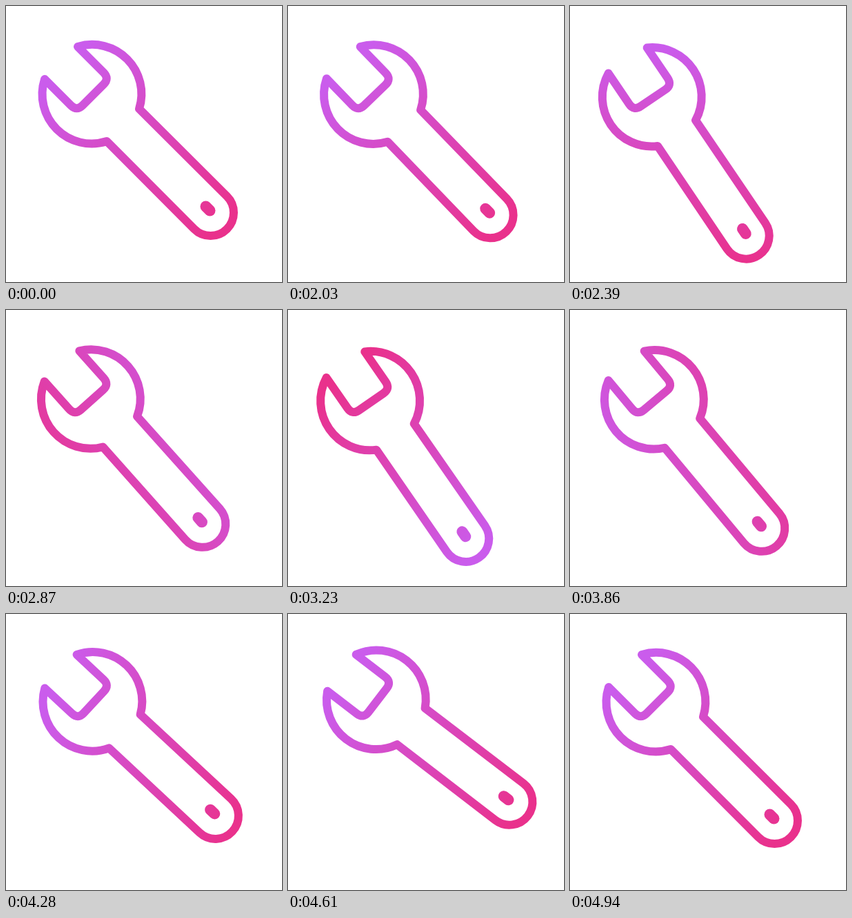
Write an HTML page that moves like this. It is 400 px wide and 400 px high and loops after 4.97 s.

```html
<!DOCTYPE html>
<html lang="en">
<head>
<meta charset="utf-8">
<title>Wrench</title>
<style>
  html, body { margin: 0; width: 100%; height: 100%; overflow: hidden; background: #fff; }
  svg { display: block; width: 100vw; height: 100vh; }
</style>
</head>
<body>
<svg viewBox="0 0 400 400">
  <defs>
    <linearGradient id="tint" gradientUnits="userSpaceOnUse">
      <stop offset="0" stop-color="#ca5cec"/>
      <stop offset="1" stop-color="#e9318c"/>
    </linearGradient>
  </defs>
  <g id="wrench" fill="none" stroke="url(#tint)" stroke-linecap="round" stroke-linejoin="round">
    <path stroke-width="12" d="M104 59 A71.5 71.5 0 0 1 193 149 L320.2 275.8
      A33.5 33.5 0 0 1 272.8 323.2 L146 196 A71.5 71.5 0 0 1 56 106
      L94 144 Q102.5 152.5 111 144 L141.5 113.5 Q150 105 141.5 96.5 Z"/>
    <path stroke-width="16" d="M289.5 290.5 L295.5 296.5"/>
  </g>
</svg>
<script>
const LOOP = 4970, REST = 2000, STEP = 30;
const PIVOT = 100, CENTER = 200, REACH = 160, TURN_STEPS = 85;

// [step, angle] pairs, eased in and out between neighbours
const SWING = [
  [0, 0], [7.5, 22.5], [21, -10], [23, -10], [36.6, 22.5], [47, -9.6],
  [55.3, -10], [69.3, 22.5], [79.3, -10], [83, -10], [95, 0], [99, 0]
];

const wrench = document.getElementById('wrench');
const tint = document.getElementById('tint');

function swingAngle(step) {
  const i = SWING.findIndex(([at]) => at > step);
  const [t0, a0] = SWING[i - 1], [t1, a1] = SWING[i];
  const eased = (1 - Math.cos(Math.PI * (step - t0) / (t1 - t0))) / 2;
  return a0 + (a1 - a0) * eased;
}

function gradientAngle(step) {
  const u = Math.min(1, step / TURN_STEPS), full = 2 * Math.PI;
  return Math.PI / 4 + full * u - 0.5 * Math.sin(full * u);
}

function draw(ms) {
  const step = Math.max(0, Math.floor((ms % LOOP - REST) / STEP));
  wrench.setAttribute('transform', `rotate(${swingAngle(step)} ${PIVOT} ${PIVOT})`);

  const angle = gradientAngle(step);
  const dx = REACH * Math.cos(angle), dy = REACH * Math.sin(angle);
  const ends = { x1: CENTER - dx, y1: CENTER - dy, x2: CENTER + dx, y2: CENTER + dy };
  for (const [name, value] of Object.entries(ends)) tint.setAttribute(name, value);
}

const start = performance.now();
function tick() {
  draw(performance.now() - start);
  requestAnimationFrame(tick);
}
tick();
</script>
</body>
</html>
```
